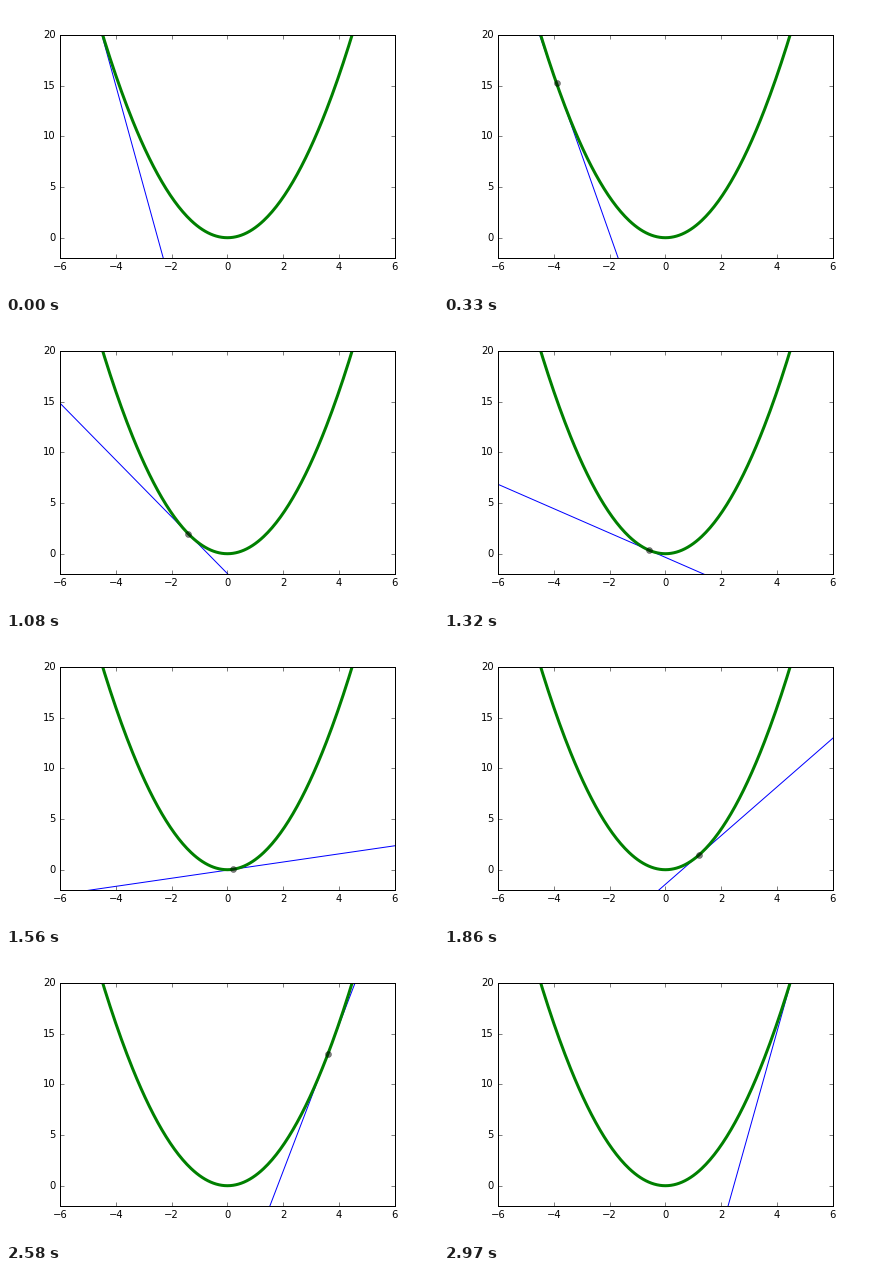
These frames come from a looping animation (432 by 288 pixels, 3000 ms). A matplotlib script:

```python
import numpy as np
import matplotlib.pyplot as plt
from matplotlib.animation import FuncAnimation

FRAMES, INTERVAL = 100, 30
X_MIN, X_MAX, STEP = -5, 5, 0.1

plt.style.use("classic")
plt.rcParams.update({
    "font.family": "DejaVu Sans",
    "font.size": 10,
    "figure.facecolor": "white",
    "savefig.facecolor": "white",
    "savefig.dpi": "figure",
})

fig = plt.figure(figsize=(6, 4), dpi=72)
ax = fig.add_axes([0.125, 0.125, 0.775, 0.775])
ax.set_xlim(-6, 6)
ax.set_ylim(-2, 20)
ax.set_xticks(range(-6, 7, 2))
ax.set_yticks(range(0, 21, 5))

xs = np.linspace(X_MIN, X_MAX, 201)
ends = np.array([-8.0, 8.0])

tangent, = ax.plot([], [], color="#0000ff", lw=1)
ax.plot(xs, xs ** 2, color="#008000", lw=3)
point, = ax.plot([], [], "o", color="black", ms=6, alpha=0.5)


def update(i):
    x0 = X_MIN + STEP * i
    tangent.set_data(ends, 2 * x0 * ends - x0 ** 2)
    point.set_data([x0], [x0 ** 2])
    return tangent, point


anim = FuncAnimation(fig, update, frames=FRAMES, interval=INTERVAL,
                     init_func=lambda: update(0), repeat=True,
                     repeat_delay=0, blit=False)
plt.show()
```
